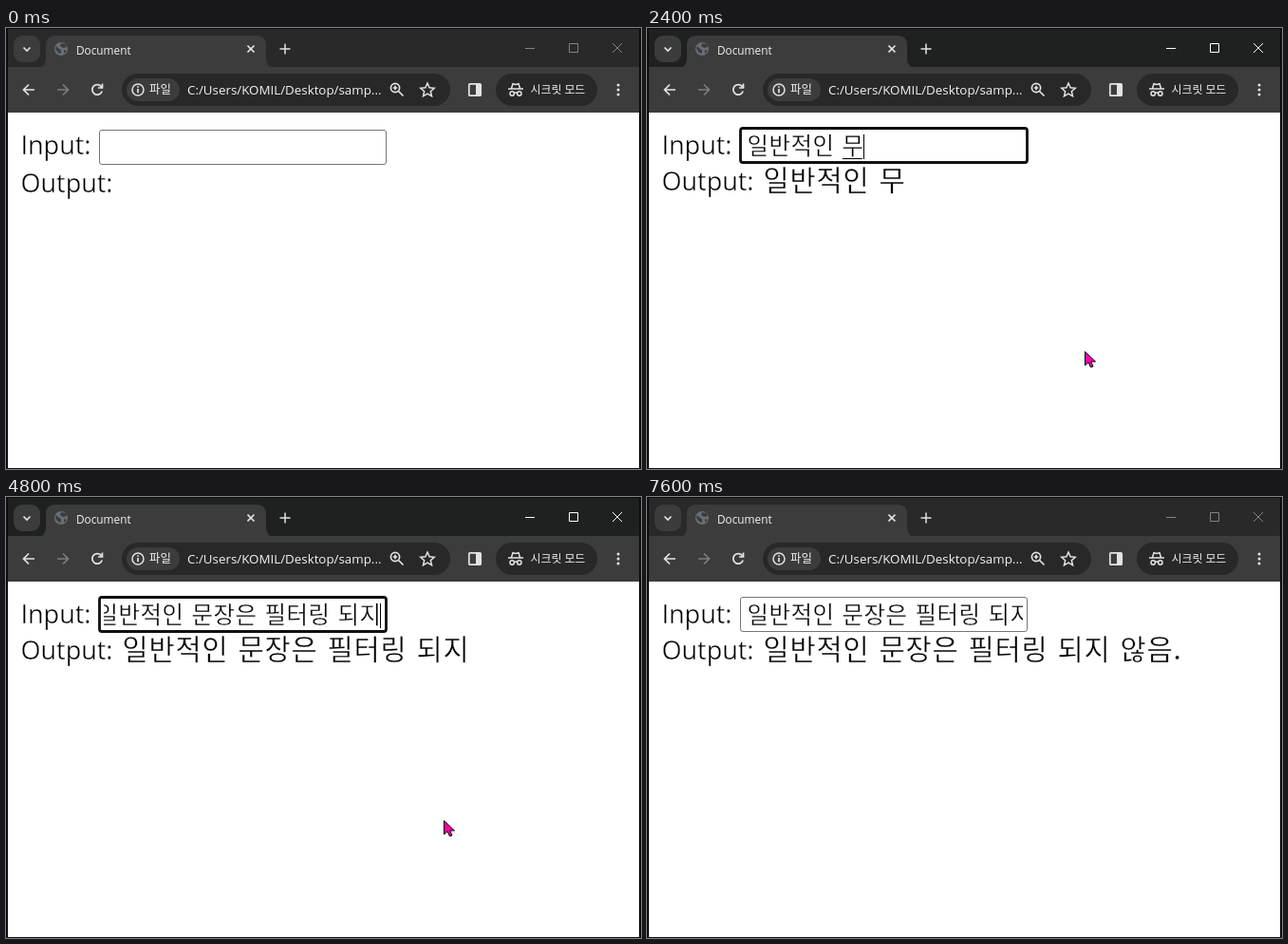
These frames come from a looping animation (669x464 px, 7700 ms). An HTML page:

```html
<!DOCTYPE html>
<html lang="ko">
<head>
<meta charset="utf-8">
<title>Document</title>
<style>
html, body { margin: 0; width: 100%; height: 100%; overflow: hidden; background: #fff; }
svg { display: block; width: 669px; height: 464px; }
text { white-space: pre; }
.ui { font: 12px "Open Sans", "Noto Sans CJK KR", "Noto Sans CJK", sans-serif; fill: #f2f2f2; }
/* the thin white stroke lightens the strokes of the page text */
.page { fill: #000; stroke: #fff; stroke-width: .4; }
.label { font: 27px "Open Sans", sans-serif; }
.ko { font-family: "Noto Sans CJK KR", "Noto Sans CJK", sans-serif; font-weight: 300; }
#typed { font-size: 24.5px; }
#out { font-size: 29.6px; }
.line { fill: none; stroke: #e3e3e3; stroke-width: 1.7; }
.thin { stroke-width: 1.5; }
.crisp { shape-rendering: crispEdges; }
</style>
</head>
<body>
<svg viewBox="0 0 669 464">
  <clipPath id="clip"><path d="M103 104H396V144H103Z"/></clipPath>
  <rect width="669" height="464" fill="#0c0c0c"/>
  <rect id="bar" x="2" y="1" width="665" height="42"/>
  <rect x="2" y="41" width="665" height="48" fill="#3c3c3c"/>
  <rect x="2" y="89" width="665" height="374" fill="#fff"/>

  <!-- tab strip -->
  <rect x="8" y="8" width="28" height="28" rx="9" fill="#3c3c3c"/>
  <path class="line" d="M18.5 20.5L22 24L25.5 20.5"/>
  <path d="M32 42Q42 42 42 32V18Q42 8 52 8H264Q274 8 274 18V32Q274 42 284 42Z" fill="#3c3c3c"/>
  <circle cx="58" cy="22" r="7" fill="#6a6f74"/>
  <path d="M53 19L56 22L58 23V27L55 26L52 22ZM58 16L63 17L64 20L60 21L57 19ZM61 23L64 24L61 27Z" fill="#3c3c3c"/>
  <text class="ui" x="74" y="28" style="font-size:11.8px">Document</text>
  <path class="line" d="M254.5 18.5L261.5 25.5M261.5 18.5L254.5 25.5"/>
  <path class="line thin" d="M288.5 22H299.5M294 16.5V27.5"/>
  <path id="controls" fill="none" d="M547 21.5H557M593.5 16.5H602.5V25.5H593.5ZM639 16L649 26M649 16L639 26"/>

  <!-- toolbar -->
  <path class="line" d="M30 65H19M24 59.5L18.5 65L24 70.5"/>
  <path class="line" style="stroke:#7d7d7d" d="M54 65H65M60 59.5L65.5 65L60 70.5"/>
  <path class="line" d="M100.6 62A5.3 5.3 0 1 0 101.2 66.5M101.5 58.5V63H97"/>
  <rect x="122" y="48" width="346" height="34" rx="17" fill="#282828"/>
  <rect x="127" y="53" width="56" height="24" rx="12" fill="#3c3c3c"/>
  <circle class="line thin" cx="139" cy="65" r="6"/>
  <path class="line" d="M139 64V68.3M139 61.2V62.8"/>
  <text class="ui" x="151" y="69" style="font-size:12.4px">파일</text>
  <text class="ui" x="191" y="70" style="font-size:13.35px">C:/Users/KOMIL/Desktop/samp...</text>
  <circle class="line" cx="410" cy="63" r="4.6"/>
  <path class="line" d="M413.5 66.5L418.5 71.5M407.8 63H412.2M410 60.8V65.2"/>
  <path class="line thin" d="M444 58L446.1 62.8L451.2 63.3L447.3 66.7L448.5 71.8L444 69.1L439.5 71.8L440.7 66.7L436.8 63.3L441.9 62.8Z"/>
  <rect class="line" x="487.8" y="58.8" width="12.4" height="12.4" rx="1"/>
  <path d="M495 59H500V71H495Z" fill="#e3e3e3"/>
  <rect x="516" y="48" width="107" height="34" rx="17" fill="#282828"/>
  <path class="line thin" d="M532.5 63.5L534 58.7L537 59.5L540 58.7L541.5 63.5M529 64H545M531 69a2.2 2.2 0 1 0 4.4 0a2.2 2.2 0 1 0-4.4 0M538.6 69a2.2 2.2 0 1 0 4.4 0a2.2 2.2 0 1 0-4.4 0M535.4 68.5Q537 67.5 538.6 68.5"/>
  <text class="ui" x="552.5" y="69" style="font-size:11.9px">시크릿 모드</text>
  <g fill="#e3e3e3"><circle cx="645" cy="60" r="1.5"/><circle cx="645" cy="65" r="1.5"/><circle cx="645" cy="70" r="1.5"/></g>

  <!-- page -->
  <text class="page label" x="15.5" y="133">Input:</text>
  <text class="page label" id="outLabel" x="15.5">Output:</text>
  <rect id="box" fill="#fff" x="98.5" width="302" height="36" rx="2.5"/>
  <g clip-path="url(#clip)"><text class="page ko" id="typed" y="132.5"></text></g>
  <rect class="crisp" id="under" y="137" height="1"/>
  <rect class="crisp" id="caret" width="1" height="26"/>
  <text class="page ko" id="out" y="171"></text>
  <path id="pointer" d="M.5 .5V15L4 11.8L6.5 17L9 16L6.7 11H11.5Z" fill="#f0a" stroke="#000"/>
</svg>
<script>
const LOOP = 7700, CLICK = 500, BLUR = 6400, LEAVE = 6900;
const LEFT = 105, RIGHT = 395, OUT_LEFT = 122;
// Advances of a syllable, a space and a full stop.
const SMALL = { cell: 23, space: 8, dot: 6 }, LARGE = { cell: 28, space: 10, dot: 7 };

// Start time, settled text, then one composing step per 100 ms ("!" = settled).
const bursts = [
  [1300, "", "이|일"],
  [1600, "일", "ㅂ|바|반|반저|반적|반적이|반적인|반적인 "],
  [2400, "일반적인 ", "무|문|문ㅈ|문자|문장"],
  [3100, "일반적인 문장", "ㅇ|으|은|은 |은 ㅍ|은 피|은 필"],
  [3900, "일반적인 문장은 필", "터|터ㄹ|터리|터링|터링 |터링 도"],
  [4600, "일반적인 문장은 필터링 ", "되|되ㅈ|되지!|되지 |되지 아|되지 안|되지 않|되지 않ㅇ"],
  [5400, "일반적인 문장은 필터링 되지 않", "으|음|음."]
];
const keys = bursts.flatMap(([start, base, steps]) =>
  steps.split("|").map((s, i) => ({ at: start + i * 100, text: base + s })));

const $ = id => document.getElementById(id);
const set = (id, attrs) => { for (const k in attrs) $(id).setAttribute(k, attrs[k]); };
const show = (id, on) => set(id, { visibility: on ? "visible" : "hidden" });
const mix = (a, b, p) => a + (b - a) * p;
const width = (s, font) => [...s].reduce((w, c) =>
  w + (c === " " ? font.space : c === "." ? font.dot : font.cell), 0);

function write(id, text, left, font) {
  $(id).textContent = text;
  set(id, { x: [...text].map((c, i) => left + width(text.slice(0, i), font)).join(" ") });
}

function pointerAt(t) {
  const leg = (from, a, b) => {
    const p = Math.min(1, Math.max(0, (t - from) / 300)), e = p * p * (3 - 2 * p);
    return [mix(a[0], b[0], e), mix(a[1], b[1], e)];
  };
  if (t < CLICK) return leg(200, [456, 342], [350, 125]);
  if (t < BLUR) return leg(CLICK, [350, 125], [461, 340]);
  const p = Math.min(1, (t - BLUR) / 200);
  return [mix(461, 465, p), mix(340, 325, p)];
}

function draw(now) {
  const t = Math.floor(now % LOOP / 100) * 100;
  const active = t >= CLICK && t < 7600, focus = t >= CLICK && t < BLUR;
  const key = keys.filter(k => k.at <= t).pop() || { at: CLICK, text: "" };
  const text = key.text.replace("!", "");
  const drop = text ? 0 : 2;

  set("bar", { fill: active ? "#1f2020" : "#292929" });
  set("controls", { stroke: active ? "#fff" : "#858585" });
  set("outLabel", { y: 171 + drop });
  set("box", { y: 105.5 + drop, stroke: focus ? "#101010" : "#767676", "stroke-width": focus ? 2.8 : 1 });

  const end = LEFT + width(text, SMALL), scroll = focus ? Math.max(0, end - RIGHT) : 0;
  const caret = end - scroll;
  write("typed", text, LEFT + .5 - scroll, SMALL);
  write("out", text, OUT_LEFT + .5, LARGE);
  set("under", { x: caret - SMALL.cell + 1, width: SMALL.cell - 2 });
  show("under", focus && /[ㄱ-힣]$/.test(key.text));
  set("caret", { x: Math.min(caret, RIGHT - 1), y: text ? 112 : 113 });
  show("caret", focus && (t - key.at) % 1000 < 500);

  set("pointer", { transform: `translate(${pointerAt(t)})` });
  show("pointer", t >= 200 && t < LEAVE);
}

(function tick() {
  draw(performance.now());
  requestAnimationFrame(tick);
})();
</script>
</body>
</html>
```
